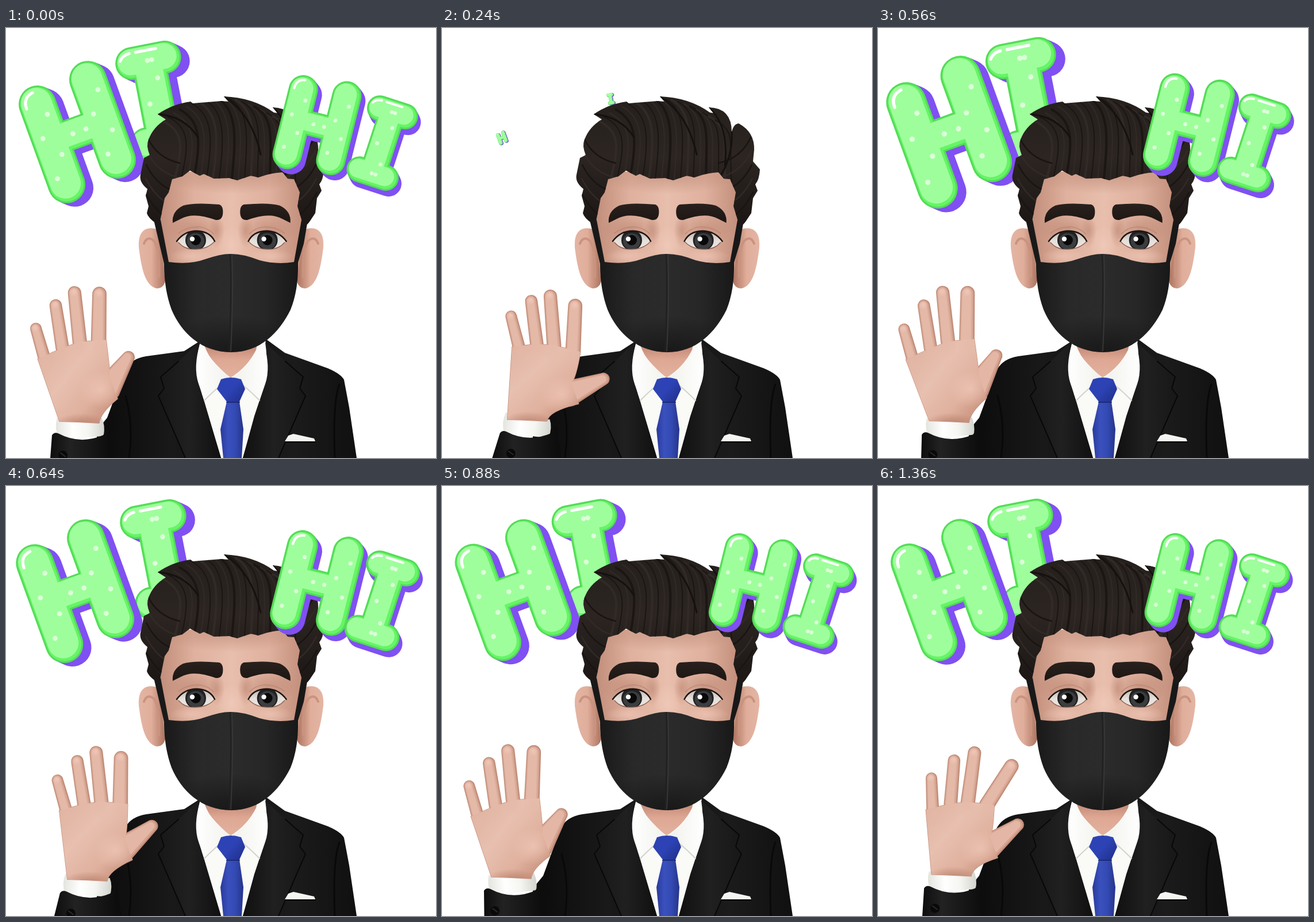
Write an HTML page with a canvas that moves like this. It is 748 px wide and 748 px high and loops after 1.44 s.

```html
<!DOCTYPE html>
<html lang="en">
<head>
<meta charset="utf-8">
<title>Waving hello</title>
<style>
html, body { margin: 0; height: 100%; overflow: hidden; background: #fff; }
canvas { display: block; width: 100vw; height: 100vh; }
</style>
</head>
<body>
<canvas id="stage" width="748" height="748"></canvas>
<script>
const ctx = document.getElementById('stage').getContext('2d');
const STEP = 80, STEPS = 18;
const { PI, sin, cos, max, abs } = Math;

// Letter outlines in their own frame: stems and bars as x1, y1, x2, y2, width
const H = {
  bars: [[-38, -54, -38, 62, 51], [38, -62, 38, 54, 51], [-36, 0, 36, 0, 43]],
  shine: 'M-54 -53Q-54 -69 -39 -71'
};
const I = {
  bars: [[-23, -56, 23, -56, 45], [0, -50, 0, 50, 47], [-24, 56, 24, 56, 45]],
  shine: 'M-38 -62Q-34 -69 -24 -70M-15 -70H13'
};
const LEFT_H = { ...H, at: [124, 181], from: [102, 192], turn: -20, size: 1.28, shade: [14, 6], drift: -4 };
const LEFT_I = { ...I, at: [261, 126], from: [297, 123], turn: -11, size: 1.27, shade: [15, 7], drift: 9 };
const RIGHT_H = { ...H, at: [541, 169], from: [545, 174], turn: 14, size: 1, shade: [7, 9] };
const RIGHT_I = { ...I, at: [655, 200], from: [659, 208], turn: 18, size: 1, shade: [5, 10] };

const SHAPE = {
  jacket: 'M338 544L310 562 244 571Q218 575 207 594L190 640 176 678 158 700V748H610L597 660 588 612Q583 602 560 592L485 565 452 541Z',
  shirt: 'M338 545Q329 580 333 612L352 675 374 748H412L432 675 455 606Q457 570 451 543Z',
  neck: 'M345 535H440L435 560Q420 590 391 608Q358 588 345 552Z',
  collar: 'M338 547Q325 590 335 619L345 648Q360 632 390 608Q356 580 338 547Z',
  lapel: 'M335 547L300 580 269 607 275 627 265 640 312 748H374L345 650Q327 600 335 547Z',
  knot: 'M374 611Q391 605 409 611L416 628 406 650H384L367 628Z',
  tie: 'M384 650H406L413 698 410 748H378L373 698Z',
  ear: 'M277 356Q258 346 246 349Q229 354 231 382C235 412 240 448 262 453Q274 453 277 440Z',
  face: 'M270 250H516L518 340 508 430 480 510H304L275 430 266 340Z',
  mask: 'M257 334H269L283 407Q320 412 347 402Q376 392 392 393Q413 393 441 404Q470 412 501 407L514 334H525L518 375 508 408Q509 455 495 490C475 530 442 564 392 564C340 564 305 530 288 490Q275 455 275 410Z',
  hair: 'M268 336L261 340Q247 330 245 322L248 310 243 292 246 280Q231 268 234 255L240 226 250 221Q243 204 248 194Q256 172 278 159L264 150Q290 132 321 128L325 131 375 127 387 128 379 119Q430 121 466 147L472 148 464 138Q504 139 504 181Q507 167 516 166Q544 181 543 212L541 232 553 246Q552 264 545 272L549 283 541 296 538 322 528 337Q520 348 516 340L507 310 511 286 501 263 490 262 481 251Q460 252 439 260L426 257 402 265 388 261 362 262 344 254 337 257 320 248 307 258 289 263 283 286 276 296Z',
  brow: 'M290 339Q288 319 308 309Q326 303 371 307Q379 310 377 325Q375 335 365 334C340 325 320 323 304 332Z',
  eye: 'M298 371Q310 353 332 353Q355 354 363 371Q350 385 328 385Q306 384 298 371Z',
  pocket: 'M485 719L491 709 500 706 536 714 538 719Z'
};
for (const key in SHAPE) SHAPE[key] = new Path2D(SHAPE[key]);

const lerp = (a, b, k) => a + (b - a) * k;
const mix = (p, q, k, dx = 0, dy = 0) => [lerp(p[0], q[0], k) + dx, lerp(p[1], q[1], k) + dy];
const polar = ([x, y], degrees, length) =>
  [x + length * sin(degrees * PI / 180), y - length * cos(degrees * PI / 180)];
const tent = (x, centre) => max(0, 1 - abs(x - centre) / 2);

// Springs from a speck to full size; the first step shows the settled picture
function pop(step, begin, damping) {
  const n = step - begin;
  if (step === 0) return 1;
  return n < 0 ? 0 : 1 - .9 * Math.exp(-damping * n) * cos(.9 * n);
}

// Wave cycle of six units: starts gently, sweeps faster, then eases off
const wavePhase = s => 1 + .6 * s + .73 * max(0, s - 5) - .33 * (max(0, s - 11) + max(0, s - 14));

function handPose(phase) {
  const angle = phase * PI / 3, c = cos(angle), s = sin(angle);
  const bump = peak => (.5 + .5 * cos(angle - peak * PI / 3)) ** 5;
  const x = 147 - 38 * c - 16 * s, slope = -5 - 11 * c - 7 * s;
  const wrist = [136 - 14 * c, 681 + 5 * s];
  const little = [x - 47, 559 - slope], index = [x + 47, 559 + slope];
  const knuckles = [little, mix(little, index, .33, 0, -8), mix(little, index, .65, 0, -8), index];
  const lean = -6 + 33 * bump(4.2), spread = 7 + 22 * bump(4.6);
  const angles = [lean - 10, lean - 3, lean, lean + spread];
  const thumb = mix(wrist, index, .5, 32, 13);
  return {
    wrist, little, index, thumb, knuckles,
    tips: knuckles.map((k, n) => polar(k, angles[n], [55, 75, 86, 80][n])),
    thumbTip: polar(thumb, 52 - 18 * c - 11 * s, 65)
  };
}

function fill(path, style) { ctx.fillStyle = style; ctx.fill(path); }

function line(d, color, width) {
  ctx.strokeStyle = color;
  ctx.lineWidth = width;
  ctx.stroke(d instanceof Path2D ? d : new Path2D(d));
}

function ellipse(x, y, rx, ry, color) {
  ctx.fillStyle = color;
  ctx.beginPath();
  ctx.ellipse(x, y, rx, ry, 0, 0, 7);
  ctx.fill();
}

function linear(x1, y1, x2, y2, ...colors) {
  const g = ctx.createLinearGradient(x1, y1, x2, y2);
  colors.forEach((c, i) => g.addColorStop(i / (colors.length - 1), c));
  return g;
}

// Soft elliptical tint, rgb given as "r,g,b"
function glow(x, y, rx, ry, rgb, alpha) {
  ctx.save();
  ctx.translate(x, y);
  ctx.scale(rx, ry);
  const g = ctx.createRadialGradient(0, 0, 0, 0, 0, 1);
  g.addColorStop(0, `rgba(${rgb},${alpha})`);
  g.addColorStop(1, `rgba(${rgb},0)`);
  ctx.fillStyle = g;
  ctx.fillRect(-1, -1, 2, 2);
  ctx.restore();
}

function clipped(path, draw) {
  ctx.save();
  ctx.clip(path);
  draw();
  ctx.restore();
}

function bothSides(draw, axis = 391.5) {
  draw();
  ctx.save();
  ctx.translate(axis * 2, 0);
  ctx.scale(-1, 1);
  draw();
  ctx.restore();
}

function letter({ bars, shine, at, from, turn, size, shade, drift = 0 }, scale, push = 0) {
  if (!scale) return;
  const place = mix(from, at, scale, drift * push, 2 * push);
  const placed = (dx, dy, draw) => {
    ctx.save();
    ctx.translate(place[0] + dx * scale, place[1] + dy * scale);
    ctx.rotate(turn * PI / 180);
    ctx.scale(size * scale, size * scale);
    draw();
    ctx.restore();
  };
  const layer = (color, inset, dx, dy) => placed(dx, dy, () => {
    for (const [x1, y1, x2, y2, w] of bars) line(`M${x1} ${y1}L${x2} ${y2}`, color, w - inset / size);
  });
  for (const k of [.35, .7, 1]) layer('#8050f2', 0, shade[0] * k, shade[1] * k);
  layer('#54dc57', 0, 0, 0);
  layer('#65f565', 6, 0, 0);
  layer('#9ffe9c', 12, -2, -2);
  placed(0, 0, () => {
    for (const [x1, y1, x2, y2] of bars) {
      const count = Math.round(Math.hypot(x2 - x1, y2 - y1) / 30);
      for (let i = 0; i < count; i++) {
        const [x, y] = mix([x1, y1], [x2, y2], (i + .6) / count);
        ellipse(x + (i % 2 ? -9 : 8), y, 3.4, 3.4, '#dcffd9');
      }
    }
    line(shine, '#fff', 4);
  });
}

function drawBody() {
  fill(SHAPE.jacket, linear(180, 0, 610, 0, '#0d0d0d', '#191919', '#121212', '#1b1b1b', '#101010'));
  line('M580 620Q568 650 572 748M208 640Q222 690 214 748', '#090909', 3);
  fill(SHAPE.shirt, '#fafaf7');
  fill(SHAPE.neck, linear(0, 545, 0, 608, '#b97f6b', '#dda793', '#e3b29f'));
  bothSides(() => {
    fill(SHAPE.lapel, linear(270, 0, 370, 0, '#181818', '#202020', '#111'));
    line('M300 580L269 607 275 627 265 640 312 748', '#080808', 2);
    fill(SHAPE.collar, linear(330, 0, 390, 0, '#fff', '#f1f1ec'));
    line('M345 648Q360 632 390 608', '#d2d2cd', 2);
  }, 393);
  fill(SHAPE.tie, linear(373, 0, 413, 0, '#2a3a9c', '#3a50bd', '#3349b2', '#253489'));
  fill(SHAPE.knot, linear(367, 608, 414, 650, '#2c42b5', '#2d43b5', '#202f8a'));
  line('M384 651H406', '#1c2a78', 2);
  fill(SHAPE.pocket, '#f4f4f1');
  line('M486 720H538', '#070707', 2);
}

function drawBrow(shut) {
  glow(330, 350, 52, 30, '170,112,92', .42);
  ctx.save();
  ctx.translate(290 + shut * 3, 330 + shut * 6);
  ctx.rotate(shut * .06);
  ctx.translate(-290, -330);
  fill(SHAPE.brow, linear(0, 305, 0, 338, '#2a211e', '#1d1613'));
  ctx.restore();
}

function drawEyes(shut) {
  bothSides(() => drawBrow(shut), 392.3);
  if (shut === 1) {
    bothSides(() => {
      glow(330, 361, 40, 18, '224,180,162', .45);
      line('M297 374Q328 381 362 377M299 375L294 373', '#1c1513', 3.5);
    }, 392.3);
    return;
  }
  for (const [offset, flip] of [[0, 1], [784.6, -1]]) {
    ctx.save();
    ctx.translate(offset, 0);
    ctx.scale(flip, 1);
    fill(SHAPE.eye, linear(0, 353, 0, 386, '#bdb2ab', '#e6dfda', '#ece6e1'));
    clipped(SHAPE.eye, () => {
      ellipse(330, 369, 18, 18, '#202123');
      ellipse(330, 371, 15, 14, '#3b3d3f');
      ellipse(330, 369, 9, 9, '#090909');
      ellipse(330 - 6 * flip, 367, 4.2, 4.2, '#fff');
      if (shut) {
        ctx.fillStyle = '#d5a28e';
        ctx.fillRect(290, 345, 80, 24);
      }
    });
    line(shut ? 'M298 371Q330 367 363 371' : 'M297 371Q310 353 332 353Q355 354 363 371', '#1c1513', 2.5);
    line('M300 373Q310 385 328 385Q350 385 362 372', '#8b6254', 1.2);
    line('M300 357Q316 345 337 346Q352 348 361 358', '#b98471', 1.2);
    ctx.restore();
  }
}

function drawHair() {
  fill(SHAPE.hair, linear(0, 120, 0, 330, '#25201d', '#2c2522', '#1d1816'));
  clipped(SHAPE.hair, () => {
    for (let i = 0; i < 20; i++) {
      const k = i / 19, foot = 292 + 212 * k, top = 270 + 205 * k;
      const crown = 160 - 38 * sin(k * PI);
      line(`M${top} ${crown}C${top + 38} ${crown + 20} ${foot + 18 - 24 * k} 200 ${foot} 268`,
        i % 2 ? '#1b1613' : '#312a26', i % 3 ? 2 : 4);
    }
    for (let i = 0; i < 5; i++) {
      const y = 190 + i * 24;
      bothSides(() => line(`M${246 - i} ${y}Q262 ${y + 36} ${302 - i * 5} ${y + 45}`,
        i % 2 ? '#322a26' : '#191411', 2.5));
    }
    line('M379 119Q428 150 443 220M464 138Q500 170 492 240M504 181Q506 220 486 255M264 150Q310 153 334 190', '#15110f', 3);
  });
}

function drawHead(shut) {
  bothSides(() => {
    fill(SHAPE.ear, linear(230, 0, 276, 0, '#e4b5a4', '#e0ae9b', '#ae7561'));
    line('M240 375Q246 360 258 371Q268 389 266 433', '#c9937f', 4);
  });
  fill(SHAPE.face, linear(264, 0, 521, 0, '#bf8b78', '#dfb19e', '#e8beac', '#dfb19e', '#bf8b78'));
  clipped(SHAPE.face, () => {
    glow(392, 254, 125, 35, '155,99,80', .4);
    glow(392, 378, 25, 34, '241,202,186', .8);
    bothSides(() => {
      glow(366, 353, 14, 30, '174,116,96', .4);
      glow(322, 397, 38, 14, '241,199,184', .65);
    });
  });
  drawEyes(shut);
  fill(SHAPE.mask, linear(275, 0, 508, 0, '#191919', '#292929', '#2b2b2b', '#272727', '#181818'));
  clipped(SHAPE.mask, () => glow(392, 565, 125, 65, '8,8,8', .55));
  line('M393 395Q396 460 391 562', '#363636', 2);
  line('M390 395Q393 460 388 562', '#202020', 2);
  drawHair();
}

function taper(a, b, ra, rb, color, dx = 0) {
  const turn = Math.atan2(b[1] - a[1], b[0] - a[0]), q = PI / 2;
  ctx.fillStyle = color;
  ctx.beginPath();
  ctx.arc(a[0] + dx, a[1], ra, turn + q, turn + 3 * q);
  ctx.arc(b[0] + dx, b[1], rb, turn - q, turn + q);
  ctx.fill();
}

function drawSleeve([x, y]) {
  const left = 76 + (x - 127) * .5;
  ctx.save();
  ctx.translate(x, y);
  ctx.rotate((x - 133) * PI / 360);
  fill(new Path2D('M-40 -8Q0 9 37 -7Q44 6 40 26L-38 28Q-46 10 -40 -8Z'),
    linear(-40, 0, 40, 0, '#e6e6e1', '#fff', '#f5f5f1', '#d6d6d1'));
  ctx.restore();
  fill(new Path2D(`M${left} 748L${x - 49} ${y + 23}Q${x - 45} ${y + 17} ${x - 38} ${y + 20}Q${x} ${y + 40} ${x + 40} ${y + 23}L${x + 50} ${y + 8} ${x + 58} 748Z`),
    linear(left, 0, x + 50, 0, '#0d0d0d', '#222', '#181818', '#0d0d0d'));
  ellipse(x - 30, y + 58, 8, 8, '#090909');
  line(`M${x - 34} ${y + 54}l8 6`, '#292929', 2);
}

function drawHand(phase) {
  const { wrist, little, index, thumb, knuckles, tips, thumbTip } = handPose(phase);
  const [x, y] = wrist;
  const outer = [little[0] - 12, little[1]], side = [index[0] + 13, index[1]];
  const heel = mix(little, wrist, .55, -25, 0), root = [thumb[0] + 17, thumb[1] + 18];
  const palm = new Path2D(`M${outer}Q${heel} ${x - 36} ${y - 1}Q${wrist} ${x + 33} ${y + 2}`
    + `Q${x + 35} ${y - 16} ${root}L${thumb[0] + 4} ${thumb[1] - 18}Q${mix(side, thumb, .65, 5, 0)} ${side}`
    + `L${knuckles[2]} ${knuckles[1]}Z`);

  drawSleeve(wrist);
  line(palm, '#c69280', 1.5);
  tips.forEach((tip, n) => {
    const r = 10 + n * .8;
    ['#c08c78', '#d3a28f', '#ddaf9d', '#e5b9a8'].forEach((tone, t) =>
      taper(knuckles[n], tip, r + 1 - t * 1.7, r - t * 1.7, tone, -t * .5));
    glow(tip[0] - 1, tip[1] - 2, 8, 9, '250,211,199', .5);
  });
  taper(thumb, thumbTip, 23, 11, '#c08a76');
  taper(thumb, thumbTip, 21, 9.5, '#d5a390', -1);
  taper(thumb, thumbTip, 18, 7, '#e3b6a5', -2);
  fill(palm, linear(outer[0], outer[1], root[0], y, '#dfb2a0', '#e8c0b0', '#dfb09d', '#bd8570'));
  clipped(palm, () => {
    for (const [kx, ky] of knuckles) glow(kx, ky + 8, 18, 22, '229,185,168', .7);
    glow(thumb[0] - 12, thumb[1] + 2, 38, 32, '238,197,181', .8);
    glow(x, y + 5, 46, 20, '165,104,83', .6);
  });
}

function draw(now) {
  const step = Math.floor(now / STEP) % STEPS;
  const left = pop(step, 3, .6), right = pop(step, 5, .9), push = tent(step, 8);
  ctx.fillStyle = '#fff';
  ctx.fillRect(0, 0, 748, 748);
  ctx.lineCap = ctx.lineJoin = 'round';
  letter(LEFT_I, left, push);
  letter(LEFT_H, left, push);
  drawBody();
  drawHead(tent(step, 14));
  letter(RIGHT_H, right);
  letter(RIGHT_I, right);
  drawHand(wavePhase(step));
}

const start = performance.now();
function tick() {
  draw(performance.now() - start);
  requestAnimationFrame(tick);
}
tick();
</script>
</body>
</html>
```
